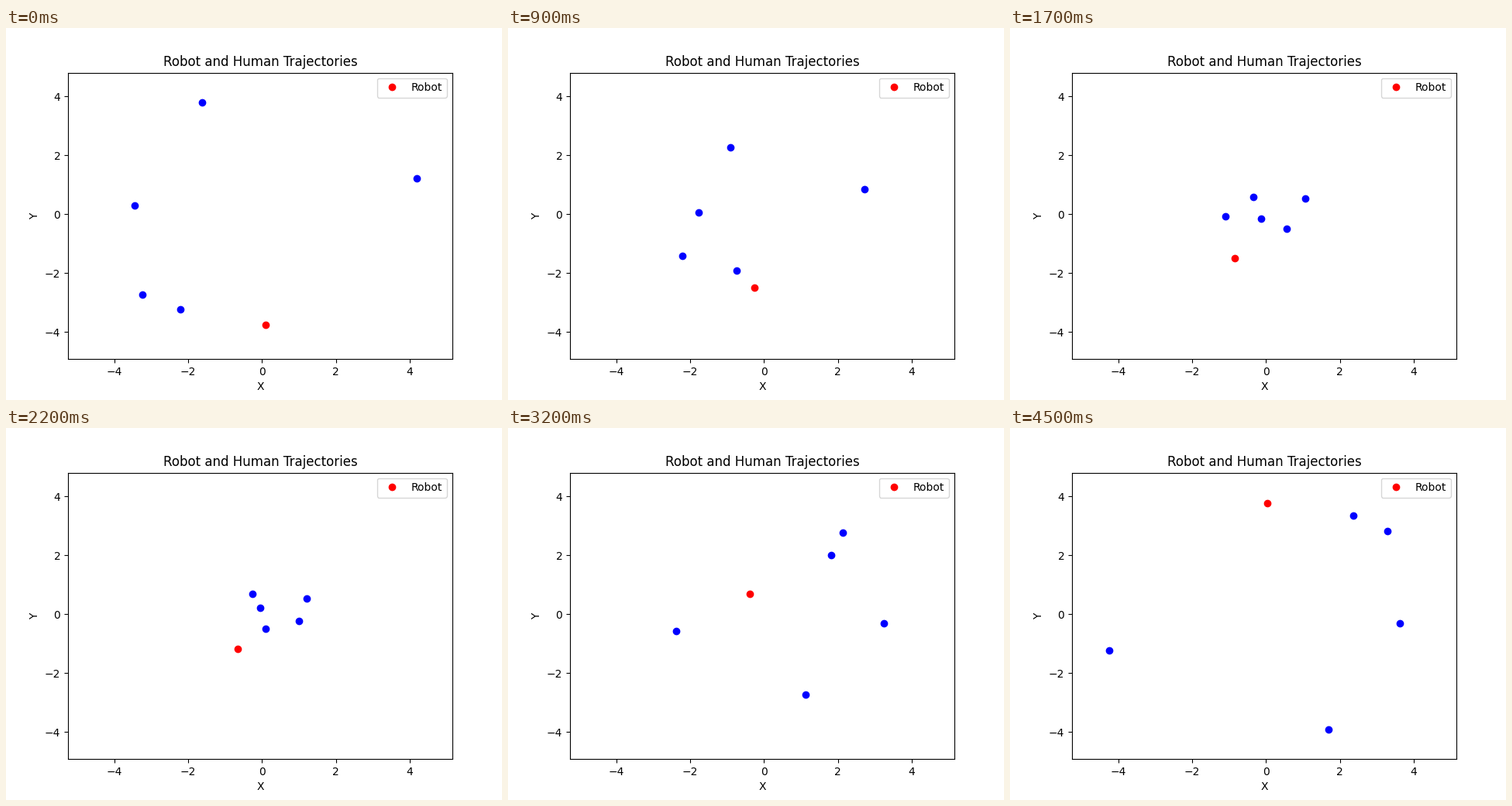
Write a matplotlib script that moves like this. It is 640 px wide and 480 px high and loops after 4.6 s.

```python
import numpy as np
import matplotlib.pyplot as plt
from matplotlib.animation import FuncAnimation

FRAMES, STEP_MS = 46, 100
W, H, DPI = 640, 480, 100
STEP = 0.25  # metres walked per frame at full speed

# Each human crosses the circle from -goal to goal and passes three way
# points at the TURNS; positions are stage pixels.
TURNS = (5, 17, 27)
HUMANS = [  # goal, way points
    ((412, 390.2), (273, 126), (314, 218), (359, 301)),
    ((124.3, 288), (494, 202), (381, 220), (273, 246)),
    ((503.4, 252.2), (210, 234), (324, 246), (436, 251)),
    ((489.3, 132), (202, 318), (278, 243), (365, 187)),
    ((442.8, 112.4), (263, 337), (357, 259), (412.6, 178)),
]
ROBOT_TURNS = (0, 5, 12, 17, 27, 28, 37, 45)
ROBOT = [(335, 383), (348, 351), (295, 324), (290, 297),
         (310, 262), (310.5, 252.5), (315, 167), (332, 97)]

fig, ax = plt.subplots(figsize=(W / DPI, H / DPI), dpi=DPI)
ax.set(xlim=(-5.26, 5.16), ylim=(-4.92, 4.81), xlabel="X", ylabel="Y",
       title="Robot and Human Trajectories")


def to_data(points):
    x, y = np.transpose(points)
    return ax.transData.inverted().transform(np.column_stack([x, H - y]))


def smooth(t, pos):
    """Cubic Hermite path through the way points, sampled at each frame."""
    t = np.asarray(t, float)
    vel = np.gradient(pos, t, axis=0, edge_order=2)
    f = np.arange(FRAMES)
    i = np.clip(np.searchsorted(t, f, side="right") - 1, 0, len(t) - 2)
    h = (t[i + 1] - t[i])[:, None]
    u = (f - t[i])[:, None] / h
    return ((1 + 2 * u) * (1 - u) ** 2 * pos[i]
            + u * (1 - u) ** 2 * h * vel[i]
            + u ** 2 * (3 - 2 * u) * pos[i + 1]
            - u ** 2 * (1 - u) * h * vel[i + 1])


def human_path(points):
    """Start opposite the goal, avoid the others, then walk straight to it."""
    goal, *turns = to_data(points)
    path = [-goal, *turns]
    rest = range(TURNS[-1] + 1, FRAMES)
    for _ in rest:
        gap = goal - path[-1]
        path.append(path[-1] + STEP * gap / max(1, np.hypot(*gap)))
    return smooth([-1, *TURNS, *rest], np.array(path))


humans = [human_path(points) for points in HUMANS]
robot = smooth(ROBOT_TURNS, to_data(ROBOT))

robot_dot, = ax.plot([], [], "ro", label="Robot")
human_dots, = ax.plot([], [], "bo")
ax.legend(loc="upper right")


def draw(frame):
    robot_dot.set_data(robot[frame, :1], robot[frame, 1:])
    human_dots.set_data(*np.array([path[frame] for path in humans]).T)
    return robot_dot, human_dots


anim = FuncAnimation(fig, draw, frames=FRAMES, interval=STEP_MS, repeat=True)
plt.show()
```
